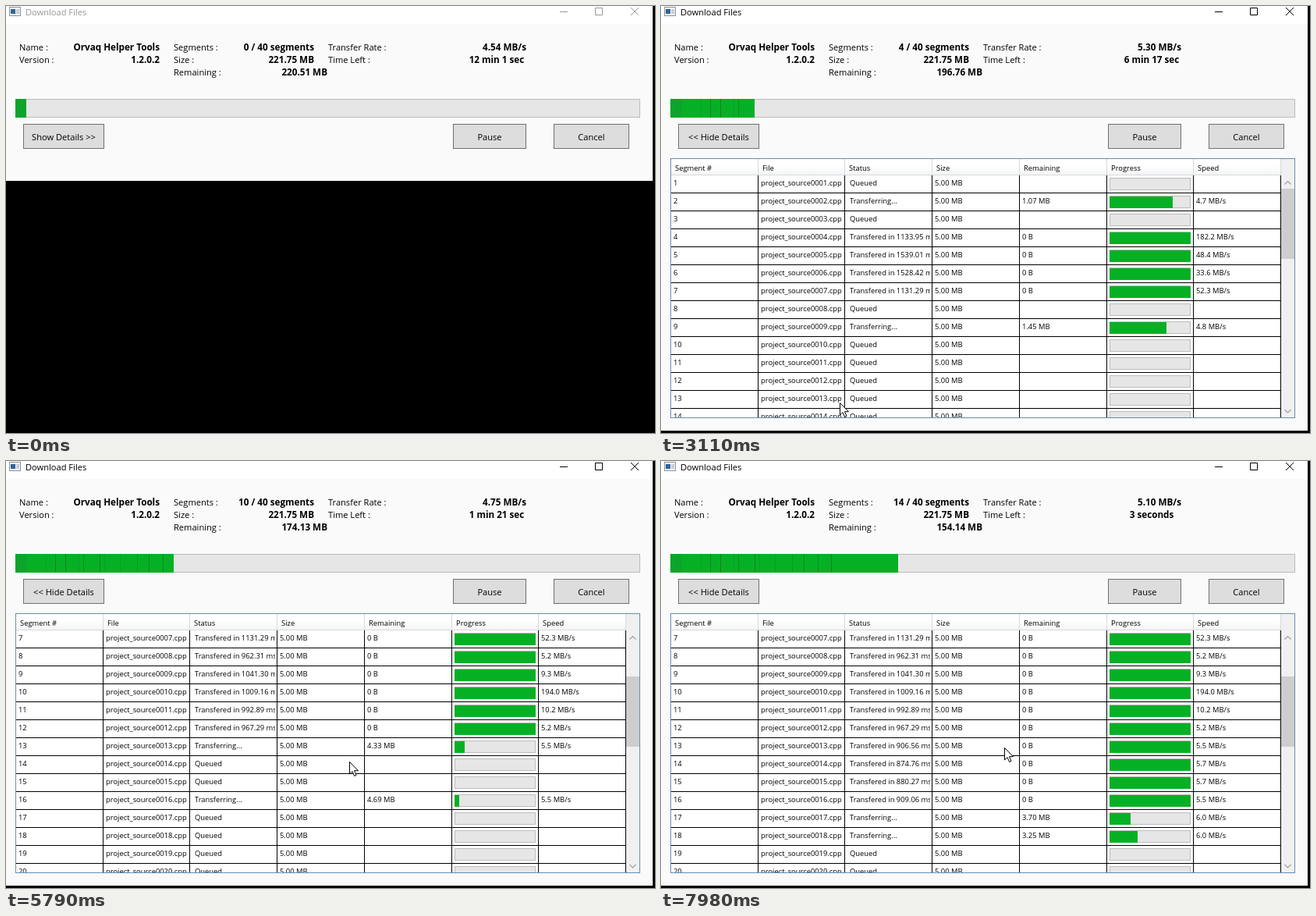
An HTML page that plays this animation: 832x547 px, repeating every 8000 ms.

```html
<!DOCTYPE html>
<html lang="en">
<head>
<meta charset="utf-8">
<title>Download Files</title>
<style>
html, body { margin: 0; width: 100%; height: 100%; overflow: hidden; background: #000; }
svg { display: block; width: 832px; height: 547px; }
text { font: 11.1px "Open Sans", "Noto Sans", sans-serif; fill: #000; white-space: pre; }
.bold { font-size: 11.7px; font-weight: 700; }
.cell { font-size: 9.4px; }
.mid { text-anchor: middle; }
.end { text-anchor: end; }
.button { fill: #ddd; stroke: #707070; }
.button.hover { fill: #bee6fd; stroke: #3c7fb1; }
.track { fill: #e6e6e6; stroke: #bcbcbc; }
.fill { fill: #06b025; }
</style>
</head>
<body>
<script>
const LOOP = 8000, SLOTS = 14, ROW_H = 23, BODY_TOP = 217;
const DETAILS_AT = 1680, ACTIVE_AT = 1560;

// Pointer stops: time, x, y (y past the stage hides it)
const POINTER = [
  [0, 330, 560], [100, 330, 490], [500, 262, 212], [800, 78, 160], [1760, 78, 160],
  [2000, 86, 231], [2490, 86, 231], [3200, 250, 548], [4130, 384, 548],
  [4420, 434, 392], [6590, 443, 381], [7340, 440, 367]
];
// Segments in the order in which the two lanes pick them up
const ORDER = [6, 5, 4, 7, 2, 9, 10, 11, 8, 12, 13, 16, 14, 15, 18, 17];

const noise = n => { const v = Math.sin(n * 91.7 + 4.1) * 43758.5; return v - Math.floor(v); };
const clamp = (v, low, high) => Math.min(high, Math.max(low, v));
const columnEdge = i => Math.round(123.7 + 111.75 * i);

// Each lane starts its next segment a short pause after the last one
function schedule() {
  const jobs = {}, pause = 120, laneEnd = [905, 1000];
  ORDER.forEach((segment, k) => {
    const lane = k % 2, round = (k - lane) / 2;
    const ms = 1120 - 43 * round + 400 * 0.1 ** round + 20 * noise(k);
    if (round) laneEnd[lane] += pause + ms;
    const speed = 5000 / ms, burst = 8 + 200 * noise(k + 40) ** 2;
    jobs[segment] = { end: laneEnd[lane], ms, speed, final: round < 4 ? burst : speed };
  });
  return jobs;
}
const jobs = schedule();

function add(parent, tag, attrs = {}, text) {
  const node = document.createElementNS("http://www.w3.org/2000/svg", tag);
  for (const key in attrs) node.setAttribute(key, attrs[key]);
  if (text !== undefined) node.textContent = text;
  return parent.appendChild(node);
}
const rect = (parent, x, y, width, height, attrs) =>
  add(parent, "rect", { x, y, width, height, ...attrs });
const label = (parent, x, y, text = "", cls = "") =>
  add(parent, "text", { x, y, class: cls }, text);
const path = (parent, d, attrs) => add(parent, "path", { d, fill: "none", ...attrs });
const set = (node, text) => { if (node.textContent !== text) node.textContent = text; };

const svg = add(document.body, "svg", { viewBox: "0 0 832 547" });
const defs = add(svg, "defs");
const clip = (id, ...box) => rect(add(defs, "clipPath", { id }), ...box);
clip("body", 13, BODY_TOP, 782, 310);
clip("status", 236, BODY_TOP, 109, 310);
clip("done", 12, 119, 0, 24);
const shade = add(defs, "linearGradient", { id: "shade", x2: 0, y2: 1 });
add(shade, "stop", { offset: 0.4, "stop-color": "#fff" });
add(shade, "stop", { offset: 1, "stop-color": "#f3f4f6" });

// Window frame and title bar
const panel = rect(svg, 0, 0, 829, 224, { fill: "#fafafa" });
rect(svg, 0, 0, 829, 23, { fill: "#fff" });
rect(svg, 4.5, 1.5, 14, 11, { fill: "#f4f4f4", stroke: "#8a9299" });
rect(svg, 6, 4, 6, 6, { fill: "#2f6499" });
rect(svg, 13, 4, 4, 6, { fill: "#c9cfd4" });
const title = label(svg, 25, 12, "Download Files");
const controls = path(svg, "M710 7.5h10M755.5 2.5h9v9h-9zM801 2l10 10M811 2l-10 10");

// Summary
[[17, "Name :", "Version :"], [215, "Segments :", "Size :", "Remaining :"],
 [413, "Transfer Rate :", "Time Left :"]].forEach(([x, ...names]) =>
  names.forEach((name, i) => label(svg, x, 57 + 16 * i, name)));
label(svg, 197, 57, "Orvaq Helper Tools", "bold end");
label(svg, 197, 73, "1.2.0.2", "bold end");
label(svg, 395, 73, "221.75 MB", "bold end");
const segments = label(svg, 395, 57, "", "bold end");
const remaining = label(svg, 412, 89, "", "bold end");
const rate = label(svg, 639, 57, "", "bold mid");
const timeLeft = label(svg, 629, 73, "", "bold mid");

// Overall bar, with thin darker seams
rect(svg, 12.5, 119.5, 800, 23, { class: "track" });
const total = add(svg, "g", { "clip-path": "url(#done)" });
const totalClip = document.querySelector("#done rect");
rect(total, 12, 119, 800, 24, { class: "fill" });
rect(total, 12, 119, 15, 24, { fill: "#0ca52b" });
for (let i = 0; i < 14; i++) {
  const x = Math.round(27 + 14 * i + 10 * noise(i));
  rect(total, x, 119, 1, 24, { fill: "#056d1a", opacity: 0.7 * noise(i + 20) });
}

// Buttons
function button(x, width, text) {
  const box = rect(svg, x + 0.5, 151.5, width - 1, 31, { class: "button" });
  return { box, text: label(svg, x + width / 2, 172, text, "mid") };
}
const toggle = button(22, 104, "Show Details >>");
button(573, 94, "Pause");
button(702, 97, "Cancel");

// Details table
const table = add(svg, "g");
rect(table, 12.5, 195.5, 800, 332, { fill: "#fff", stroke: "#688caf" });
rect(table, 13, 196, 782, 21, { fill: "url(#shade)" });
rect(table, 795, 196, 17, 331, { fill: "#f0f0f0" });
const names = ["Segment #", "File", "Status", "Size", "Remaining", "Progress", "Speed"];
const verticals = (y, height) =>
  names.map((_, i) => `M${columnEdge(i) + 0.5} ${y}v${height}`).join("");
path(table, "M13 216.5H795" + verticals(196, 21), { stroke: "#d8d9db" });
names.forEach((name, i) => label(table, columnEdge(i - 1) + 6, 211, name, "cell"));
const thumb = rect(table, 795, 234, 17, 90, { fill: "#cdcdcd" });
path(table, "M799.5 228.5l4-4 4 4M799.5 517l4 4 4-4", { stroke: "#a0a0a0", "stroke-width": 1.2 });

const body = add(table, "g", { "clip-path": "url(#body)" });
const statusLayer = add(body, "g", { "clip-path": "url(#status)" });
const slots = Array.from({ length: SLOTS }, (_, i) => {
  const top = BODY_TOP + i * ROW_H;
  const cell = (x, text, parent = body) => label(parent, x, top + 12.5, text, "cell");
  rect(body, 575.5, top + 3.5, 103, 15, { class: "track" });
  cell(351, "5.00 MB");
  return {
    number: cell(16),
    file: cell(128),
    status: cell(242, "", statusLayer),
    left: cell(463),
    speed: cell(686),
    fill: rect(body, 575, top + 4, 0, 15, { class: "fill" })
  };
});
path(body, slots.map((_, i) => `M13 ${239.5 + i * ROW_H}H795`).join("") +
  verticals(BODY_TOP, 310), { stroke: "#000" });

const pointer = path(svg, "M.5.5V16L4 12.6 6.6 18.5 9 17.5 6.5 11.7H11.5Z",
  { fill: "#fff", stroke: "#000" });

function along(keys, t) {
  const i = keys.findIndex(key => key[0] > t);
  if (i < 0) return keys[keys.length - 1].slice(1);
  const a = keys[i - 1], b = keys[i], k = (t - a[0]) / (b[0] - a[0]);
  return a.slice(1).map((v, n) => v + (b[n + 1] - v) * k);
}
function rateAt(t) {
  const n = Math.floor(t / 40);
  return noise(n) > 0.9 ? 12 + 200 * noise(n + 500) : 4.5 + 1.2 * noise(n + 900);
}
function duration(seconds) {
  const s = Math.round(seconds);
  return s < 60 ? `${s} seconds` : `${Math.floor(s / 60)} min ${s % 60} sec`;
}
// Below 1 MB the size counts in 16 KB blocks
function size(mb) {
  if (mb >= 1) return mb.toFixed(2) + " MB";
  return (Math.round(mb * 64) * 16 + 0.06).toFixed(2) + " KB";
}
function rowState(segment, t) {
  const job = jobs[segment];
  const done = job ? clamp(1 - (job.end - t) / job.ms, 0, 1) : 0;
  if (!done) return { done, status: "Queued", left: "", speed: "" };
  const finished = done === 1;
  return {
    done,
    status: finished ? `Transfered in ${job.ms.toFixed(2)} ms` : "Transferring...",
    left: finished ? "0 B" : size(5 * (1 - done)),
    speed: (finished ? job.final : job.speed).toFixed(1) + " MB/s"
  };
}
// The wheel moves three rows per notch: four notches down, then two up
function firstRow(t) {
  const notches = (from, most) => clamp(Math.floor((t - from) / 120), 0, most);
  return 1 + 3 * (notches(4400, 4) - notches(5210, 2));
}

function draw(t) {
  const s = t / 1000;
  const finished = Object.values(jobs).filter(job => job.end <= t).length;
  set(segments, `${finished} / 40 segments`);
  set(remaining, (220.51 - 7.2 * s - 0.14 * s * s).toFixed(2) + " MB");
  set(rate, rateAt(t).toFixed(2) + " MB/s");
  set(timeLeft, duration(Math.max(3, 721 - 110.5 * s)));
  totalClip.setAttribute("width", Math.round(14 + 27.2 * s + 0.95 * s * s));

  const ink = t < ACTIVE_AT ? "#999" : "#000";
  title.style.fill = ink;
  controls.style.stroke = ink;

  const [x, y] = along(POINTER, t).map(Math.round);
  pointer.setAttribute("transform", `translate(${x} ${y})`);
  toggle.box.classList.toggle("hover", x >= 22 && x < 126 && y >= 151 && y < 183);

  const open = t >= DETAILS_AT;
  panel.setAttribute("height", open ? 544 : 224);
  table.style.display = open ? "" : "none";
  set(toggle.text, open ? "<< Hide Details" : "Show Details >>");
  if (!open) return;

  const first = firstRow(t);
  thumb.setAttribute("y", Math.round(234 + (first - 1) * 6.92));
  slots.forEach((slot, i) => {
    const n = first + i, row = rowState(n, t);
    set(slot.number, String(n));
    set(slot.file, `project_source${String(n).padStart(4, "0")}.cpp`);
    set(slot.status, row.status);
    set(slot.left, row.left);
    set(slot.speed, row.speed);
    slot.fill.setAttribute("width", Math.floor(104 * row.done));
  });
}

const start = performance.now();
function tick() {
  const t = Math.max(0, performance.now() - start) % LOOP;
  draw(Math.floor(t / 10) * 10);
  requestAnimationFrame(tick);
}
tick();
</script>
</body>
</html>
```
